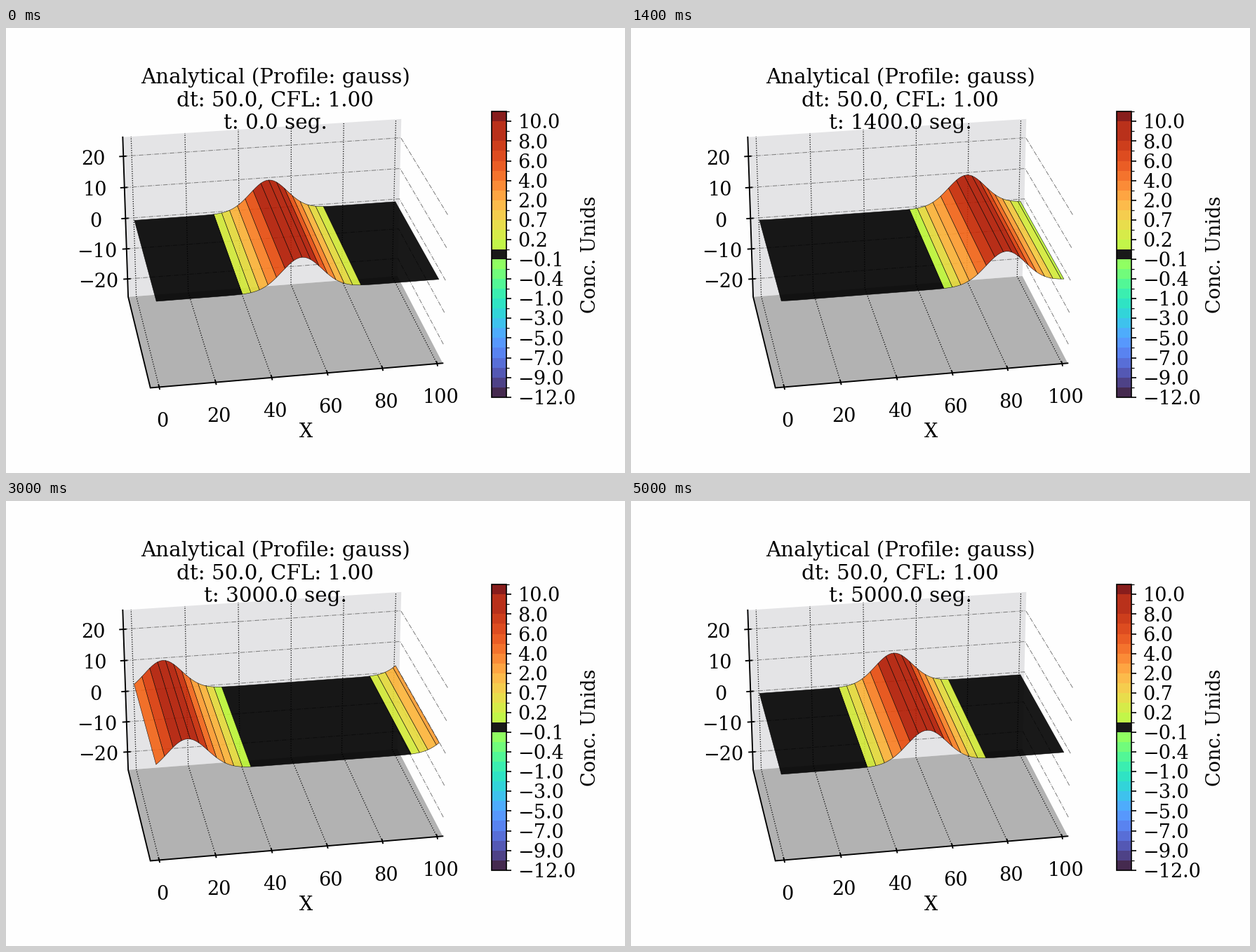
A matplotlib script that plays this animation: 882x635 px, repeating every 5.05 s.

```python
from itertools import groupby

import numpy as np
import matplotlib.pyplot as plt
from matplotlib.animation import FuncAnimation
from matplotlib.collections import PolyCollection
from matplotlib.patches import Polygon, Rectangle

W, H, DPI = 882, 635, 100
PT = 72 / DPI                       # points per pixel
FRAMES, STEP_MS = 101, 50
DT = 50.0
ALPHA = 0.9

# Box limits: x, y (front/back) and z
X0, X1 = -3.1, 102.1
F, B = -0.021, 1.034
Z = 25 + 50 / 48

LEVELS = [0.1, 0.2, 0.4, 0.7, 1, 2, 3, 4, 5, 6, 7, 8, 9, 10, 12]
BOUNDS = np.array([-v for v in reversed(LEVELS)] + LEVELS)
COLORS = plt.get_cmap("turbo", len(BOUNDS) - 1)(np.arange(len(BOUNDS) - 1))
FLAT = len(LEVELS) - 1              # band around zero
COLORS[FLAT] = (0, 0, 0, 1)
COLORS[-2] = COLORS[-3]             # one red from 8 to 10

# World point -> pixel pairs that fix the camera
ANCHORS = [
    (X0, F, -Z, 206, 513.5), (X1, F, -Z, 623, 478.5),
    (X0, B, -Z, 174, 384), (X1, B, -Z, 558, 353.5),
    (X0, B, Z, 166, 156), (X1, B, Z, 564.5, 130),
    (X1, F, 20, 629.5, 265.7),
    (0, 1, 0, 183, 274), (100, 1, 0, 554, 248),
    (0, 0, 0, 214.5, 389.5), (100, 0, 0, 616.5, 359),
    (0, 1, 9.9, 181, 230.5), (100, 1, 9.9, 555, 205),
    (0, 0, 9.9, 213, 343.7), (100, 0, 9.9, 618, 313.5),
    (0, F, -Z, 218, 512.5), (100, F, -Z, 614, 479.3),
    (0, B, Z, 178.5, 155.2), (100, B, Z, 556, 130.6),
    (0, B, -Z, 186, 383), (100, B, -Z, 550, 354.2),
]


def solve_camera(anchors):
    rows, rhs = [], []
    for x, y, z, px, py in anchors:
        p = [x / 100, y, z / Z, 1]
        o = [0] * 4
        rows.append(p + o + [-px * c for c in p[:3]])
        rows.append(o + p + [-py * c for c in p[:3]])
        rhs += [px, py]
    h = np.linalg.lstsq(np.array(rows), np.array(rhs), rcond=None)[0]
    return np.append(h, 1).reshape(3, 4)


CAMERA = solve_camera(ANCHORS)


def project(x, y, z):
    x, y, z = np.broadcast_arrays(x, y, z)
    u, v, w = CAMERA @ np.array([x / 100, y, z / Z, np.ones(x.shape)])
    return np.column_stack([u / w, v / w])


def path(*points):
    return project(*np.array(points, float).T)


fig = plt.figure(figsize=(W / DPI, H / DPI), dpi=DPI, facecolor="#fefefe")
ax = fig.add_axes([0, 0, 1, 1])
ax.set_xlim(0, W)
ax.set_ylim(H, 0)
ax.axis("off")


def line(pts, width, color="k", style="-", z=2, cap="butt"):
    pts = np.asarray(pts)
    ax.plot(pts[:, 0], pts[:, 1], color=color, lw=width * PT, ls=style,
            zorder=z, solid_capstyle=cap, solid_joinstyle="miter")


def label(x, y, s, size=27.08, ha="center", **kw):
    return ax.text(x, y, s, fontsize=size * PT, family="DejaVu Serif",
                   ha=ha, va="baseline", zorder=10, **kw)


def signed(v, fmt):
    return format(v, fmt).replace("-", "\u2212")


def draw_box():
    wall = path((X0, B, -Z), (X1, B, -Z), (X1, B, Z), (X0, B, Z))
    floor = path((X0, F, -Z), (X1, F, -Z), (X1, B, -Z), (X0, B, -Z))
    ax.add_patch(Polygon(wall, fc="#e4e4e6", ec="none", zorder=1))
    ax.add_patch(Polygon(floor, fc="#b2b2b2", ec="none", zorder=1))

    for x in range(0, 101, 20):
        line(path((x, F, -Z), (x, B, -Z), (x, B, Z)), 1.25, style=":")
        px, py = path((x, F, -Z))[0]
        line([(px - 0.9, py - 3.6), (px + 0.9, py + 3.6)], 1.9, z=3)
        label(px + 4.9, py + 56.4, str(x))

    for z in range(-20, 21, 10):
        line(path((X0, B, z), (X1, B, z), (X1, F, z)), 1.04, "#808080", "-.")
        px, py = path((X0, B, z))[0]
        line([(px - 6, py + 0.4), (px + 4.5, py - 0.3)], 1.9, z=3)
        label(128.3 - 0.18 * z, py + 11.8, signed(z, "d"))

    line(path((X0, B, Z), (X0, B, -Z), (X0, F, -Z), (X1, F, -Z)), 1.9,
         z=3, cap="projecting")
    label(427.5, 583.5, "X")


def draw_colorbar():
    left, right, top, bottom = 691.5, 712.5, 119.3, 526.7
    step = (bottom - top) / len(COLORS)
    for i, c in enumerate(COLORS):
        tint = ALPHA * c[:3] + 1 - ALPHA
        ax.add_patch(Rectangle((left, bottom - (i + 1) * step), right - left,
                               step, fc=tint, ec="none", aa=False, zorder=2))
    for i, v in enumerate(BOUNDS):
        y = bottom - i * step
        major = i % 2 == 0
        line([(right, y), (right + (7.5 if major else 4.5), y)],
             1.67 if major else 1.25, z=4)
        if major:
            label(729.3, y + 10.1, signed(v, ".1f"), ha="left")
    ax.add_patch(Rectangle((left, top), right - left, bottom - top,
                           fc="none", ec="k", lw=1.67 * PT, zorder=4))
    label(840.3, 323.5, "Conc. Unids", rotation=90, rotation_mode="anchor")


def profile(x, shift):
    d = (x - 51 - shift + 50) % 100 - 50
    return 10 * np.exp(-d ** 2 / 100)


def span(a, b):
    return np.arange(a, b + 1.0)


def band(a, b, shift):
    return np.searchsorted(BOUNDS, profile(span(a, b), shift).mean(),
                           side="right") - 1


def strips(shift):
    """Three-cell strips; neighbours in the flat band form one piece."""
    cells = [(a, min(a + 3, 100)) for a in range(0, 100, 3)]
    verts, faces = [], []
    for k, run in groupby(cells, key=lambda c: band(*c, shift)):
        run = list(run)
        if k == FLAT:
            run = [(run[0][0], run[-1][1])]
        for a, b in run:
            x = span(a, b)
            z = profile(x, shift)
            verts.append(np.vstack([project(x, 1.0, z),
                                    project(x, 0.0, z)[::-1]]))
            faces.append((*COLORS[k][:3], ALPHA))
    return verts[::-1], faces[::-1]


draw_box()
draw_colorbar()

TITLE = 29.35
label(383.7, 79, "Analytical (Profile: gauss)", TITLE)
label(383.5, 111.2, "dt: 50.0, CFL: 1.00", TITLE)
clock = label(383.5, 144, "", TITLE)

surface = PolyCollection([], edgecolors=[(0, 0, 0, ALPHA)],
                         linewidths=0.55 * PT, zorder=5)
ax.add_collection(surface, autolim=False)


def update(i):
    verts, faces = strips(i)
    surface.set_verts(verts)
    surface.set_facecolor(faces)
    clock.set_text(f"t: {i * DT:.1f} seg.")
    return surface, clock


anim = FuncAnimation(fig, update, frames=FRAMES, interval=STEP_MS,
                     repeat=True, repeat_delay=0, blit=False)
plt.show()
```
